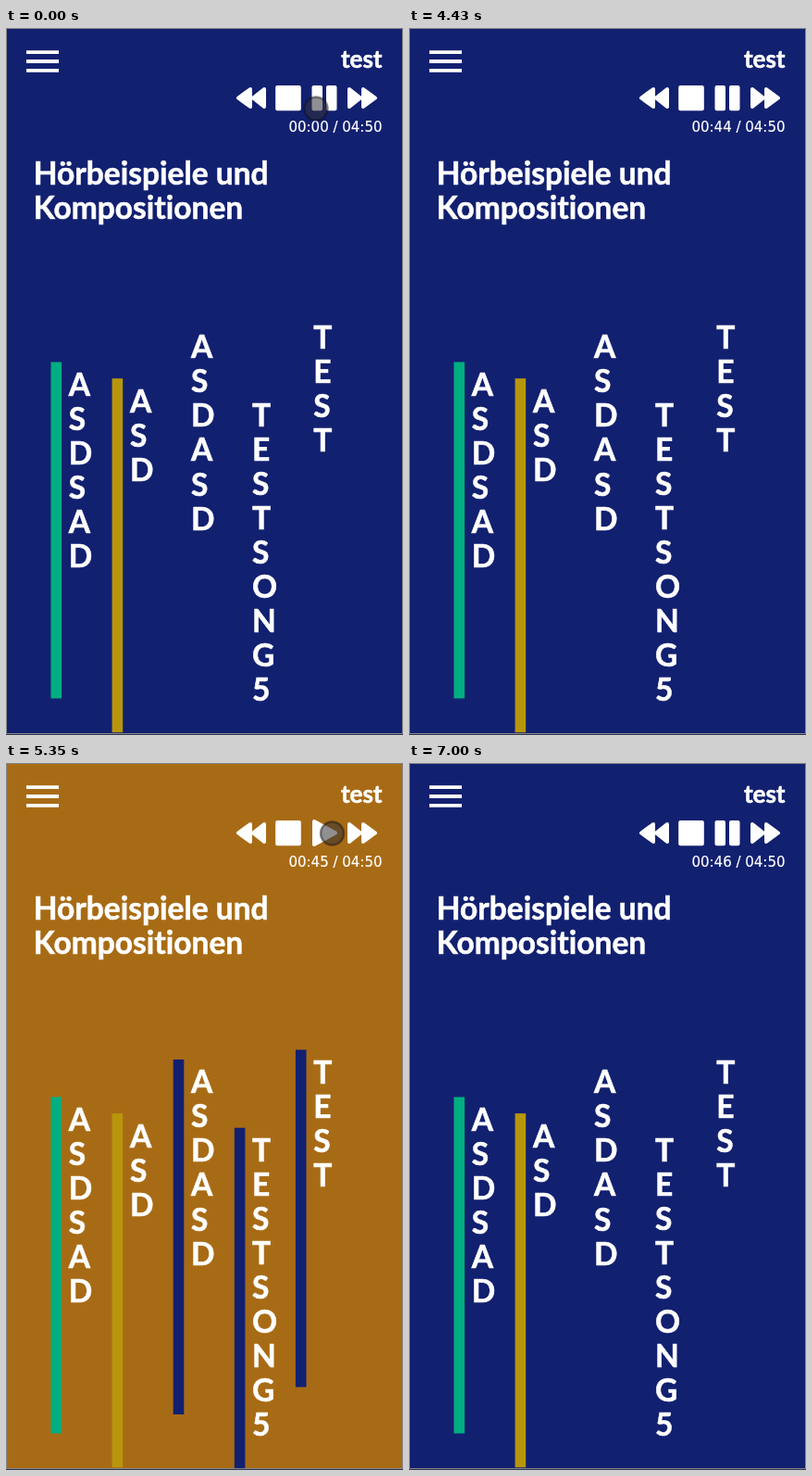
Write an HTML page that moves like this. It is 429 px wide and 763 px high and loops after 8000 ms.

```html
<!DOCTYPE html>
<html lang="de">
<head>
<meta charset="utf-8">
<title>Hörbeispiele und Kompositionen</title>
<style>
  html, body { margin: 0; width: 100%; height: 100%; overflow: hidden; }
  svg { display: block; width: 100%; height: 100%; }
  text {
    fill: #fff; stroke: #fff; stroke-width: .6;
    font: 700 33.5px Lato, sans-serif; font-variant-ligatures: none; white-space: pre;
  }
  #name { font-size: 26px; text-anchor: end; }
  #clock { font: 400 15px "DejaVu Sans", sans-serif; stroke-width: .2; text-anchor: end; }
  .icon { fill: #fff; stroke: #fff; stroke-width: 4; stroke-linejoin: round; }
</style>
</head>
<body>
<svg viewBox="0 0 429 763" preserveAspectRatio="none">
  <rect id="page" width="429" height="763"/>
  <g id="columns"></g>

  <path d="M22 26.1H57M22 36H57M22 45.9H57" stroke="#fff" stroke-width="3.8"/>
  <text id="name" x="406.5" y="43">test</text>
  <text x="29.8" y="169">Hörbeispiele und</text>
  <text x="29.8" y="206">Kompositionen</text>

  <g class="icon">
    <path id="skip" d="M371 66L383 75.5L371 85ZM386 66L399 75.5L386 85Z"/>
    <use href="#skip" transform="translate(650 0) scale(-1 1)"/>
    <rect x="293.2" y="64" width="23.6" height="23.2"/>
    <path id="pause" d="M332.5 64h7.5v23.2h-7.5ZM348 64h7.5v23.2h-7.5Z"/>
    <path id="play" d="M333 63L356 75.5L333 88Z"/>
  </g>
  <text id="clock" x="406.5" y="112"></text>

  <circle id="touch" r="12.5" fill="#323237" fill-opacity=".54" stroke="#101014" stroke-opacity=".45" stroke-width="2.5"/>
  <path d="M.5 763V.5H428.5V763M0 761.5H429" fill="none" stroke="#85868a"/>
  <path d="M0 762.5H429" stroke="#30344c"/>
</svg>
<script>
const LOOP = 8000, PAUSE = 5055, RESUME = 6235;
const FADE = 500, ICON_LAG = 160;
const NAVY = [18, 32, 112], ORANGE = [188, 117, 8];
const SKIPS = [2080, 2200, 3230, 3510];   // each jumps ten seconds ahead

const touches = [
  { from: 0, to: 1170, x: 335, y: 87 },
  { from: 1430, to: 1690, x: 395.5, y: 76 },
  { from: 1690, to: 2200, x: 380, y: 81 },
  { from: 3080, to: 3230, x: 380, y: 81 },
  { from: 4190, to: 4430, x: 380, y: 80 },
  { from: 4990, to: 7000, x: 352.5, y: 76 }
];
const songs = [
  { label: "ASDSAD", top: 360.5, height: 363, color: "#00ae80" },
  { label: "ASD", top: 378.2, height: 382, color: "#b8960c" },
  { label: "ASDASD", top: 320, height: 383, color: "#122070" },
  { label: "TESTSONG5", top: 393.7, height: 383, color: "#122070" },
  { label: "TEST", top: 309.5, height: 364, color: "#122070" }
];

const $ = id => document.getElementById(id);
const show = (el, on) => el.setAttribute("visibility", on ? "visible" : "hidden");

$("columns").innerHTML = songs.map(({ label, top, height, color }, i) => {
  const x = 48.5 + 66.1 * i;
  const letters = [...label].map((letter, row) =>
    `<text x="${x + 19.3}" y="${top + 36.3 + 37.05 * row}">${letter}</text>`);
  return `<rect x="${x}" y="${top}" width="11.6" height="${height}" fill="${color}"/>` + letters.join("");
}).join("");

// The CSS "ease" curve, cubic-bezier(.25, .1, .25, 1), solved by bisection.
function ease(x) {
  if (x <= 0 || x >= 1) return x <= 0 ? 0 : 1;
  const bezier = (a, b, u) => 3 * a * u * (1 - u) ** 2 + 3 * b * u * u * (1 - u) + u ** 3;
  let low = 0, high = 1;
  while (high - low > 1e-4) {
    const mid = (low + high) / 2;
    if (bezier(.25, .25, mid) < x) low = mid; else high = mid;
  }
  return bezier(.1, 1, low);
}

const ticks = elapsed => Math.floor((Math.max(0, elapsed) + 320) / 1075);

function draw(now) {
  const t = now % LOOP;

  const mix = ease((t - PAUSE) / FADE) - ease((t - RESUME) / FADE);
  const color = NAVY.map((c, i) => Math.round(c + (ORANGE[i] - c) * mix));
  $("page").setAttribute("fill", `rgb(${color})`);

  const seconds = ticks(Math.min(t, PAUSE)) + ticks(t - RESUME)
    + 10 * SKIPS.filter(start => start <= t).length;
  $("clock").textContent = `00:${String(seconds).padStart(2, "0")} / 04:50`;

  const paused = t >= PAUSE + ICON_LAG && t < RESUME + ICON_LAG;
  show($("play"), paused);
  show($("pause"), !paused);

  const touch = touches.find(({ from, to }) => from <= t && t < to);
  show($("touch"), touch);
  if (touch) $("touch").setAttribute("transform", `translate(${touch.x} ${touch.y})`);
  requestAnimationFrame(draw);
}
draw(performance.now());
</script>
</body>
</html>
```
